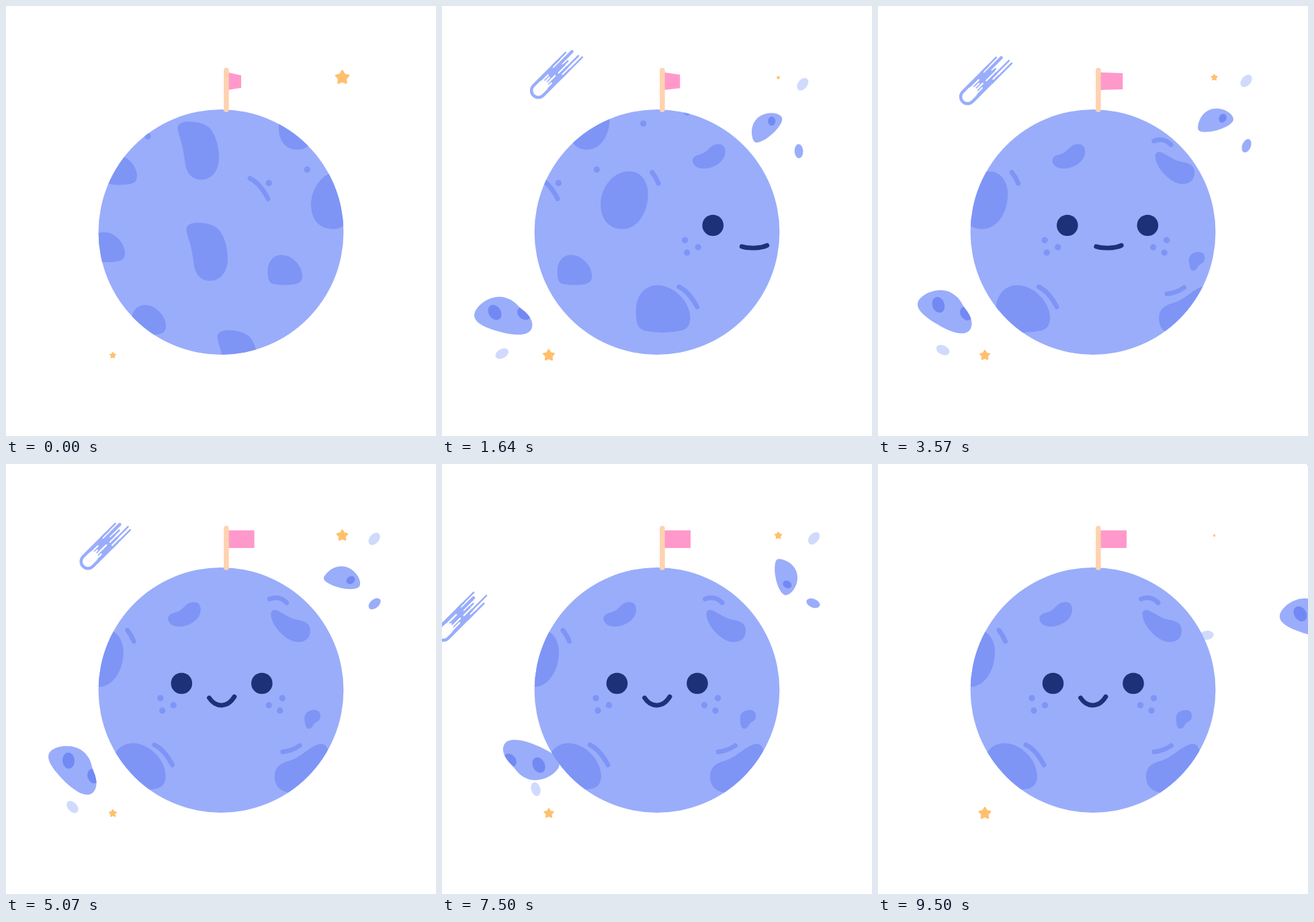
These frames come from a looping animation (640 by 640 pixels, 9.57 s). An HTML page with a canvas:

```html
<!DOCTYPE html>
<html lang="en">
<head>
<meta charset="utf-8">
<title>Little planet</title>
<style>
html, body { margin: 0; height: 100%; overflow: hidden; background: #fff; }
canvas { display: block; }
</style>
</head>
<body>
<canvas id="stage" width="640" height="640"></canvas>
<script>
const ctx = document.getElementById('stage').getContext('2d');
const LOOP = 9570, FPS = 14;
const BODY = '#9aadfa', CRATER = '#7e95f6', SPOT = '#7289f4', PALE = '#d0dafc', INK = '#1c3177';
const SHIFT = 350.5; // distance the surface scrolls

const shapes = {
  kidney: 'M255.5 183C255 174 265 172 272 172C286 172 300 176 306 185C314 197 317 212 317 226C317 245 306 258.5 291 258.5C276 258.5 269 248 267 236C264 215 262 205 259 197C257 191 256 187 255.5 183Z',
  pebble: 'M0 24.5C0 9.5 8.5 0 20.5 0C36.5 0 51.5 16.5 51.5 30.5C51.5 39.5 47.5 42.5 40.5 43.5C32.5 45.3 18.5 45.3 10.5 43.5C2.5 42.5 0 37.5 0 24.5Z',
  egg: 'M0 49C0 24 18.5 0 42.5 0C60.5 0 70.5 16 70.5 34C70.5 62 54.5 86 32.5 86C12.5 86 0 72 0 49Z',
  beans: 'M240.5 232C239 224 247 222 254 220C264 217 266 205.5 279 205.5C287 205.5 289.5 212 289 218C288 232 272 242 257 242C248 242 242 238 240.5 232Z' +
    'M393.5 224C393 218 398 216 403 218C414 223 421 230 434 232C445 234 452 238 452 248C452 259 445 265 434 265C417 265 394 241 393.5 224Z' +
    'M443.5 379C443 371 450 366 458 366C465 366 468 371 467 377C466 384 459 383 457 388C455 393 452 394 449.5 394C445 394 444 386 443.5 379Z' +
    'M399 465C399 452 406 446 420 442C438 437 450 421 465 417C473 415 478 420 480 432C485 470 450 495 425 490C406 488 399 478 399 465Z',
  lines: 'M180 247.5Q186 255 189.5 264M220 418Q235 425 247 448M391.5 201Q406 195 417 206.5M411 428.5Q425 427 436.5 419M12.5 256.5Q28 264 39.5 287',
  leftRock: 'M-44 9C-43 -6 -26 -25.5 -7 -25.5C8 -25.5 12 -20 22 -16C36 -11 44 -3 44 6C44 22 15 25.5 -4 25.5C-28 25.5 -44 22 -44 9Z',
  rightRock: 'M-26 12C-25 -4 -14 -17 2 -17C15 -17 27 -8 27 -1C27 8 2 18 -14 18C-21 18 -26 17 -26 12Z'
};
for (const name in shapes) shapes[name] = new Path2D(shapes[name]);

// [shape, x, y, scale] on the surface at rest
const craters = [
  ['kidney', -350.5, 0, 1], ['kidney', -337.5, 150.5, 1], ['kidney', -291.5, 310.5, 1],
  ['pebble', 39, 370.5, 1], ['pebble', -207, 221.5, 1], ['pebble', -225, 336.5, 1],
  ['pebble', -164, 445, 1], ['pebble', 156, 415.5, 1.57],
  ['egg', 103.5, 246, 1], ['egg', 55.5, 139, 0.87], ['beans', 0, 0, 1]
];
const dots = [
  [229, 348.5], [232, 367], [248.5, 359], [410.5, 348.5], [407, 367], [390.5, 359],
  [40.7, 263.5], [97.7, 243.5], [167, 175], [232, 158.5], [-139.5, 194]
];

const clamp = x => Math.min(1, Math.max(0, x));
const smooth = x => (x = clamp(x), x * x * (3 - 2 * x));
const grow = (t, at, rate) => Math.exp(rate * (t - at));

// cubic-bezier(1/3, 0, 0, 1)
function glide(x) {
  let lo = 0, hi = 1;
  for (let i = 0; i < 24; i++) {
    const s = (lo + hi) / 2;
    if (s * (1 - s) ** 2 + s ** 3 < x) lo = s; else hi = s;
  }
  return smooth(lo);
}

function at(x, y, degrees, draw, scale = 1) {
  ctx.save();
  ctx.translate(x, y);
  ctx.rotate(degrees * Math.PI / 180);
  ctx.scale(scale, scale);
  draw();
  ctx.restore();
}

function ellipse(x, y, rx, ry, color, degrees = 0) {
  ctx.fillStyle = color;
  ctx.beginPath();
  ctx.ellipse(x, y, rx, ry, degrees * Math.PI / 180, 0, 7);
  ctx.fill();
}

function stroke(path, color, width) {
  ctx.strokeStyle = color;
  ctx.lineWidth = width;
  ctx.stroke(path);
}

function line(x1, y1, x2, y2, color, width) {
  const path = new Path2D();
  path.moveTo(x1, y1);
  path.lineTo(x2, y2);
  stroke(path, color, width);
}

function rock(path, spots) {
  ctx.fillStyle = BODY;
  ctx.fill(path);
  ctx.clip(path);
  for (const [x, y, rx, ry, turn] of spots) ellipse(x, y, rx, ry, SPOT, turn);
}

function star(x, y, radius) {
  at(x, y, 0, () => {
    const path = new Path2D();
    for (let i = 0; i < 10; i++) {
      const a = i * Math.PI / 5, r = i % 2 ? 0.48 : 0.88;
      path.lineTo(r * Math.sin(a), -r * Math.cos(a));
    }
    path.closePath();
    ctx.fillStyle = '#ffc06e';
    ctx.fill(path);
    stroke(path, '#ffc06e', 0.28);
  }, radius);
}

function comet(t) {
  const enter = grow(t, 1.14, -3), leave = grow(t, 6.5, 0.9);
  const x = 137.2 + 31 * enter - 55 * leave, y = 131.6 - 29 * enter + 49 * leave;
  at(x, y, -45, () => {
    const wave = i => 4 * Math.sin(t * 7 + i * 2.1);
    ctx.fillStyle = BODY;
    ctx.fillRect(0, -11, 55, 22);
    line(0, 0, 50, 0, BODY, 25);
    ctx.fillStyle = '#fff';
    ctx.fillRect(56, -14, 30, 28);
    line(0, 0, 10, 0, '#fff', 16);
    [30, 22, 33, 25].forEach((end, i) => line(8, i * 4 - 6, end + wave(i), i * 4 - 6, '#fff', 2.4));
    [44, 50, 40, 46].forEach((start, i) => line(start + wave(i), i * 5.6 - 8.4, 66, i * 5.6 - 8.4, '#fff', 2.2));
    [[72, 2.6], [73, 4.6], [62, 2.6], [82, 2.6], [78, 2.6]].forEach(([end, width], i) =>
      line(40, i * 5.6 - 11.2, end + wave(i), i * 5.6 - 11.2, BODY, width));
  });
}

function leftRocks(t) {
  const enter = grow(t, 1.14, -3), turnIn = grow(t, 1.14, -1.8), turnOut = grow(t, 6.5, 0.9);
  let leave = grow(t, 6.5, 1.5);
  at(103 - 43.5 * enter + 6 * leave, 453 + 34 * enter - 2.5 * leave, 27 - 27.6 * turnIn + 72 * turnOut, () =>
    rock(shapes.leftRock, [[-15.5, 0, 12, 9, 40], [26.5, -11, 11, 8.5, 25]]));
  leave = grow(t, 6.5, 1.1);
  ellipse(96 - 31 * enter + 14.5 * leave, 512.5 + 22 * enter - 9.5 * leave, 10.5, 6.8, PALE,
    200 - 126 * turnIn + 95 * turnOut);
}

function rightRocks(t) {
  const enter = grow(t, 1.14, -4), k = Math.min(enter, 1.05);
  const outX = grow(t, 8.43, 1.6), outY = grow(t, 8.43, 2.8);
  const u = t - 3.57, turn = 16.8 * u + 1.84 * u * u;
  const pale = Math.min(enter, 2.6);
  ellipse(548 - 84 * pale + 24.5 * outX, 111.5 + 37 * pale - 12 * outY, 10.5, 7, PALE, 130 - 15 * pale);
  at(502 - 150 * k + 45 * outX, 169.5 + 66 * k - 18 * outY, turn, () =>
    rock(shapes.rightRock, [[11, -2.5, 5.5, 6.8, 25]]));
  ellipse(548.5 - 130 * k + 17.5 * outX, 208 + 60 * k - 10.5 * outY, 10.5, 6.4, BODY, 112 + 0.95 * turn);
}

function face(t, shift) {
  const faceShift = shift * (1.12 - shift * 0.00033);
  const open = 0.1 + 0.9 * smooth(Math.abs(t - 8.5) / 0.2);
  for (const x of [260.5, 380]) ellipse(x + faceShift, 326.5, 15.8, 15.8 * open, INK);
  const smile = smooth(t - 4), x = faceShift + Math.min(shift * 0.1, 2);
  const mouth = new Path2D();
  mouth.moveTo(301.5 + x, 358 - 10 * smile);
  mouth.bezierCurveTo(311 + x, 361 + 2 * smile, 329 + x, 361 + 2 * smile, 339 + x, 356.3 - 10 * smile);
  stroke(mouth, INK, 6.8);
}

function planet(t) {
  const shift = SHIFT * (1 - glide(clamp(t / 5.5)));
  ctx.save();
  ellipse(320, 336.5, 182.4, 182.4, BODY);
  ctx.clip();
  ctx.translate(shift, 0);
  for (const [name, x, y, scale] of craters) {
    at(x, y, 0, () => {
      ctx.fillStyle = CRATER;
      ctx.fill(shapes[name]);
    }, scale);
  }
  for (const [x, y] of dots) ellipse(x, y, 4.7, 4.7, CRATER);
  stroke(shapes.lines, CRATER, 7);
  ctx.translate(-shift, 0);
  face(t, shift);
  ctx.restore();
}

function flag(t) {
  const open = smooth(t / 5.5), right = 350 + 20 * open, inset = 4.5 * (1 - open);
  ctx.fillStyle = '#ff99cb';
  ctx.beginPath();
  ctx.moveTo(330, 98.7);
  ctx.lineTo(right, 98.7 + inset);
  ctx.lineTo(right, 125 - inset * 0.75);
  ctx.lineTo(330, 125);
  ctx.fill();
  line(327.9, 95.7, 327.9, 154.3, '#ffd2b0', 7.6);
}

function render(ms) {
  const t = Math.floor((ms % LOOP + 5) * FPS / 1000) / FPS;
  ctx.clearRect(0, 0, 640, 640);
  ctx.lineCap = ctx.lineJoin = 'round';
  comet(t);
  leftRocks(t);
  rightRocks(t);
  planet(t);
  flag(t);
  const phase = t / 1.375 % 2, twinkle = smooth(phase < 1 ? phase : 2 - phase);
  star(500.5, 106.5, 11 - 9 * twinkle);
  star(159, 520, 5.1 + 4.6 * twinkle);
}

const start = performance.now();
(function tick() {
  render(performance.now() - start);
  requestAnimationFrame(tick);
})();
</script>
</body>
</html>
```
